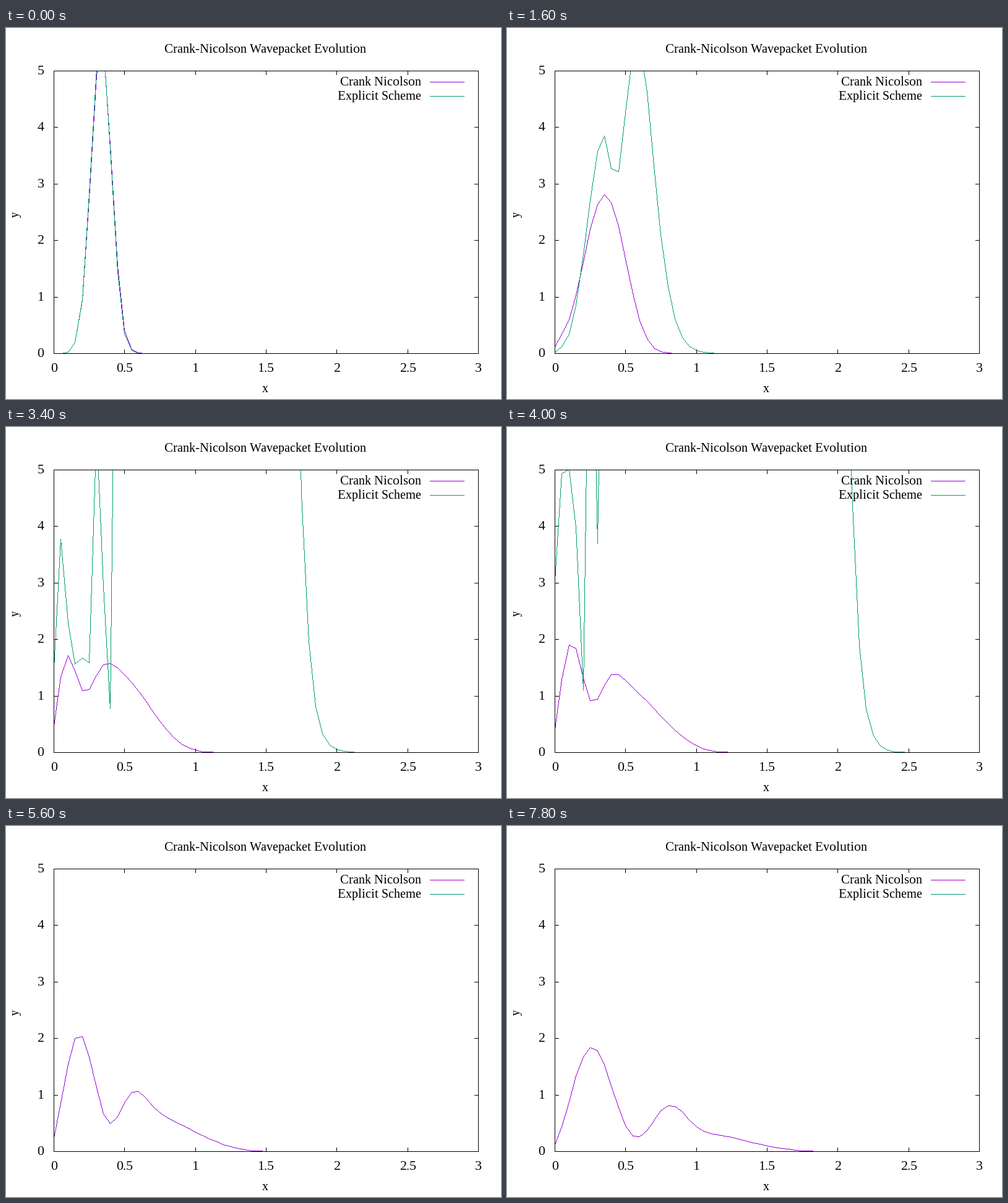
Animation, 800 px wide and 600 px high, one loop 8 s. Source, as a matplotlib script:

```python
import numpy as np
import matplotlib.pyplot as plt
from matplotlib.animation import FuncAnimation

plt.rcParams.update({
    "font.family": "Liberation Serif",
    "path.simplify": False,
    "text.hinting": "default",
    "text.hinting_factor": 1,
})

W, H, DPI = 800, 600, 100
FRAMES, INTERVAL = 40, 200
PX = 72 / DPI                      # one pixel in points
LEFT, RIGHT, TOP, BOTTOM = 77, 763, 69, 526
PURPLE, GREEN = "#9400d3", "#009e73"

# Free wavepacket on a grid, psi = 0 just outside both ends
DX, DT, NODES = 0.05, 0.002, 101
SHOWN = 61                         # nodes with x <= 3
X0, SIGMA, K0 = 1 / 3, 0.1, 1.0
BLOWN_UP = 30                      # explicit solution is off the scale from here

x = np.arange(NODES) * DX
psi0 = np.exp(-(x - X0) ** 2 / (2 * SIGMA ** 2) + 1j * K0 * x)
psi0 /= np.sqrt(SIGMA * np.sqrt(np.pi))


def implicit_run():
    """Crank-Nicolson densities after 1, 2, ... steps."""
    lap = (np.diag(np.full(NODES, -2.0))
           + np.diag(np.ones(NODES - 1), 1)
           + np.diag(np.ones(NODES - 1), -1)) / DX ** 2
    half = 0.25j * DT * lap
    step = np.linalg.solve(np.eye(NODES) - half, np.eye(NODES) + half)
    psi, out = psi0, []
    for _ in range(FRAMES):
        psi = step @ psi
        out.append(np.abs(psi) ** 2)
    return out


def explicit_run():
    """Forward steps swept in place from left to right; unstable."""
    b = 0.5j * DT / DX ** 2
    psi = np.concatenate(([0], psi0, [0]))
    out = []
    for _ in range(BLOWN_UP):
        out.append(np.abs(psi[1:-1]) ** 2)
        for j in range(1, NODES + 1):
            psi[j] += b * (psi[j + 1] - 2 * psi[j] + psi[j - 1])
    return out


def px(v):
    return np.round(LEFT + v * (RIGHT - LEFT) / 3)


def py(v):
    return np.round(BOTTOM - np.minimum(v, 1e6) * (BOTTOM - TOP) / 5)


def trace(density):
    """Thin stepped line inside the plot box: one short dash per pixel."""
    xs, ys = px(x[:SHOWN]), py(density[:SHOWN])
    cols, rows = [], []
    for xa, ya, xb, yb in zip(xs, ys, xs[1:], ys[1:]):
        dx, dy = xb - xa, yb - ya
        if abs(dy) <= dx:
            c = np.arange(xa, xb + 1)
            r = np.round(ya + (c - xa) * dy / dx)
        else:
            r = np.arange(max(TOP, min(ya, yb)), min(BOTTOM, max(ya, yb)) + 1)
            c = np.round(xa + (r - ya) * dx / dy)
        cols.append(c)
        rows.append(r)
    c, r = np.concatenate(cols), np.concatenate(rows)
    keep = (r >= TOP) & (r <= BOTTOM)
    c, r = c[keep], r[keep] + 0.5
    dash_x = np.column_stack((c + 0.3, c + 0.7, np.full(len(c), np.nan)))
    return dash_x.ravel(), np.repeat(r, 3)


fig = plt.figure(figsize=(W / DPI, H / DPI), dpi=DPI, facecolor="white")
ax = fig.add_axes([0, 0, 1, 1])
ax.set_xlim(0, W)
ax.set_ylim(H, 0)
ax.axis("off")


def line(xs, ys, color="black", z=4):
    # without smoothing every touched pixel is filled, so stay under 1 px
    return ax.plot(xs, ys, color=color, lw=0.45 * PX, antialiased=False,
                   snap=False, zorder=z, solid_capstyle="butt",
                   solid_joinstyle="miter")[0]


def label(tx, ty, s, ha="center", **kw):
    ax.text(tx, ty, s, ha=ha, va="baseline", fontsize=64 / 3 * PX,
            color="black", zorder=1, **kw)


# Border and inward ticks
l, r, t, b = LEFT + 0.5, RIGHT + 0.5, TOP + 0.5, BOTTOM + 0.5
line([l, r, r, l, l], [t, t, b, b, t])
TICK = 6
for i in range(7):
    tx = px(i / 2) + 0.5
    line([tx, tx], [b, b - TICK])
    line([tx, tx], [t, t + TICK])
    label(tx, 556, f"{i / 2:g}")
for i in range(6):
    ty = py(i) + 0.5
    line([l, l + TICK], [ty, ty])
    line([r, r - TICK], [ty, ty])
    label(61.5, ty + 5.5, str(i), ha="right")

label(419, 40, "Crank-Nicolson Wavepacket Evolution")
label(418.5, 589, "x")
label(21, 301, "y", rotation=90, rotation_mode="anchor")

# Key
for ky, name, color in ((87, "Crank Nicolson", PURPLE),
                        (110, "Explicit Scheme", GREEN)):
    label(670.5, ky + 6, name, ha="right")
    line([685.2, 740.8], [ky + 0.5, ky + 0.5], color, z=2)

implicit, explicit = implicit_run(), explicit_run()
cn = line([], [], PURPLE, z=2)
ex = line([], [], GREEN, z=3)


def update(n):
    cn.set_data(*trace(implicit[n]))
    ex.set_data(*(trace(explicit[n]) if n < BLOWN_UP else ([], [])))
    return cn, ex


anim = FuncAnimation(fig, update, frames=FRAMES, interval=INTERVAL,
                     init_func=lambda: update(0), repeat=True)
plt.show()
```
